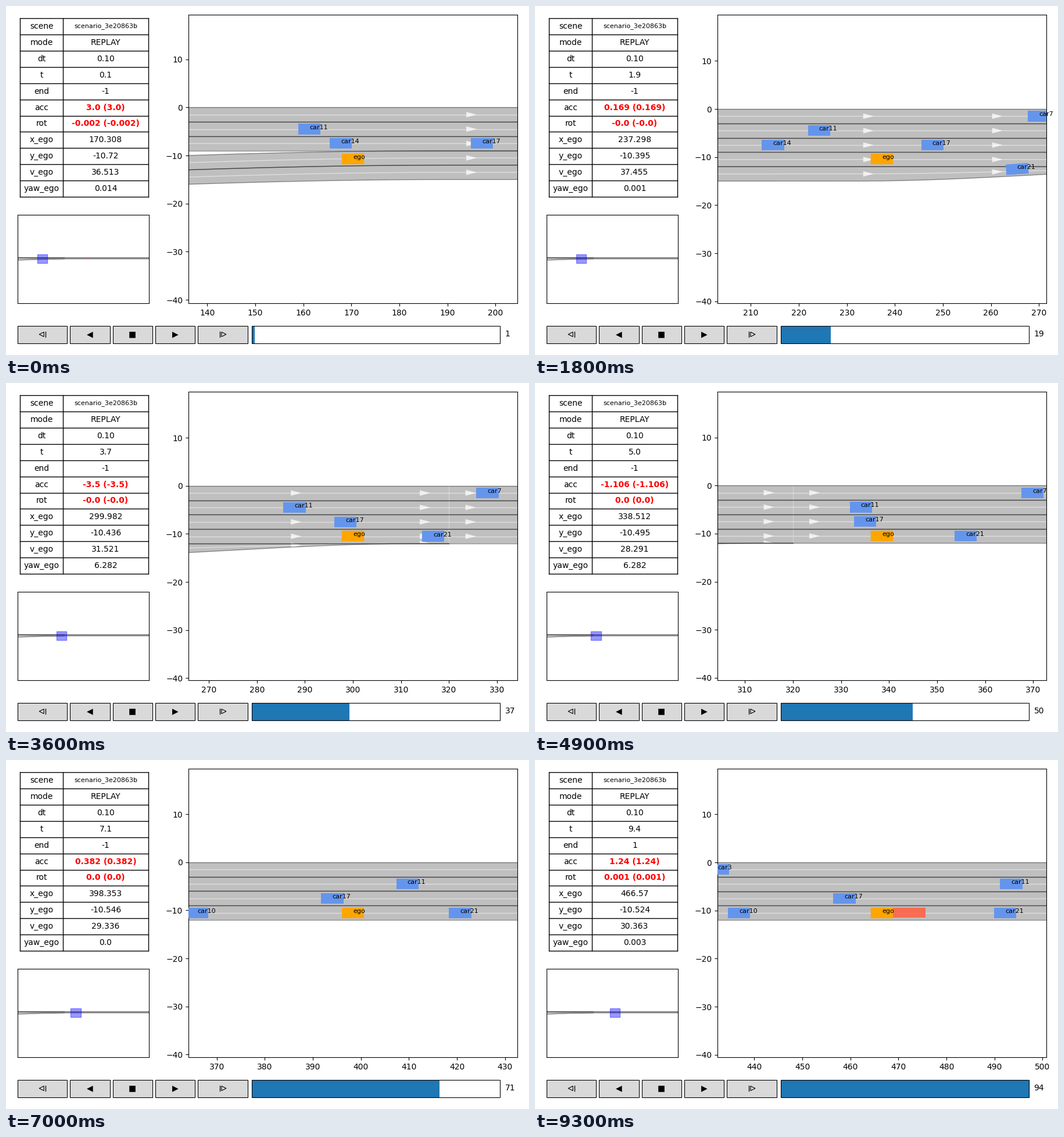
Write a matplotlib script that moves like this. It is 900 by 600 pixels and loops after 9.4 s.

```python
import matplotlib.pyplot as plt
import numpy as np
from matplotlib.animation import FuncAnimation
from matplotlib.patches import Polygon, Rectangle
from matplotlib.ticker import MultipleLocator

W, H = 900, 600
FRAMES = 94
HALF_Y = 30
HALF_X = HALF_Y * 566 / 496
CAR_LENGTH, CAR_WIDTH = 4.65, 2.2
WHEELBASE = 2.6
LANE_W = 3

# Key points of the ego drive: time, position, speed, acceleration
EGO_KEYS = [(0.1, 170.308, 36.513, 3.0),
            (1.9, 237.298, 37.455, 0.169),
            (3.7, 299.982, 31.521, -3.5),
            (7.1, 398.353, 29.336, 0.382),
            (9.4, 466.57, 30.363, 1.24)]

# Traffic: lane, start, speed, acceleration
TRAFFIC = {
    "car3": (0, 103.4, 35, 0),
    "car7": (0, 208.85, 32.2, 0),
    "car10": (3, 122.8, 36.84, -0.73),
    "car11": (1, 157.79, 34.77, 0.2),
    "car14": (2, 165.17, 26.03, 0),
    "car17": (2, 194.35, 28.13, 0),
    "car21": (3, 198.85, 31.2, 0),
}


def smooth(s):
    s = np.clip(s, 0, 1)
    return s * s * (3 - 2 * s)


def ego_drive(t):
    """Position, speed and acceleration from a quintic between key points."""
    k = 0
    while k < len(EGO_KEYS) - 2 and t >= EGO_KEYS[k + 1][0]:
        k += 1
    (t0, x0, v0, a0), (t1, x1, v1, a1) = EGO_KEYS[k:k + 2]
    h = t1 - t0
    c1, c2 = v0 * h, a0 * h * h / 2
    d = x1 - x0 - c1 - c2
    e = v1 * h - c1 - 2 * c2
    f = a1 * h * h - 2 * c2
    poly = [6 * d - 3 * e + f / 2, -15 * d + 7 * e - f, 10 * d - 4 * e + f / 2, c2, c1, x0]
    return [np.polyval(np.polyder(poly, n), (t - t0) / h) / h ** n for n in range(3)]


def ego_y(t):
    """Settle into the lane, drift back slowly, steer up a little at the end."""
    settle = -0.36 * np.exp((0.1 - t) / 0.7)
    drift = -0.186 * smooth((t - 1.2) / 5.8)
    return -10.36 + settle + drift + 0.022 * np.exp((t - 9.4) / 0.25)


def rate(func, t, step=0.005):
    return (func(t + step) - func(t - step)) / (2 * step)


def ego_yaw(t):
    return rate(ego_y, t) / ego_drive(t)[1]


def car_pose(name, t):
    lane, start, speed, accel = TRAFFIC[name]
    x = start + speed * t + accel * t * t / 2
    y = -LANE_W * (lane + 0.5)
    if name == "car21":  # joins from the ending lane while gaining speed
        x += 23.7 * np.exp(-t / 1.62)
        y -= LANE_W * (1 - smooth((t - 1) / 2.3))
    return np.array([x, y])


def corners(x, y, yaw):
    c, s = np.cos(yaw), np.sin(yaw)
    box = np.array([[-1, -1], [1, -1], [1, 1], [-1, 1]]) * [CAR_LENGTH / 2, CAR_WIDTH / 2]
    return box @ np.array([[c, s], [-s, c]]) + [x, y]


def lane_edges(lane, x):
    ramp = -5 * (1 - smooth(x / 190)) if lane >= 3 else 0 * x
    top = -LANE_W * lane + ramp
    bottom = top - LANE_W
    if lane == 4:
        bottom = bottom + LANE_W * smooth((x - 232) / 82)
    return top, bottom


def draw_arrow(ax, lane, x):
    y0, y1 = (np.mean(lane_edges(lane, v)) for v in (x, x + 2.2))
    ax.add_patch(Polygon([(x, y0 - 0.57), (x + 2.2, y1), (x, y0 + 0.57)],
                         color="white", alpha=0.75, lw=0, zorder=1.45))


def draw_road(ax, edge_width, detail):
    for lane in range(5):
        end = 320 if lane == 4 else 900
        x = np.arange(0, end + 1, 2.0)
        top, bottom = lane_edges(lane, x)
        ax.fill_between(x, bottom, top, color="gray", alpha=0.5, lw=0, zorder=1)
        for edge in (top, bottom):
            ax.plot(x, edge, color="black", alpha=0.4, lw=edge_width, zorder=1.5)
        if not detail:
            continue
        ax.plot(x, (top + bottom) / 2, color="white", alpha=0.5, lw=1, zorder=1.4)
        for first, last in ((0, 200), (230, 320), (320, 900)):
            if last <= end:
                for start in np.linspace(first + 3.4, last - 6.1, 4):
                    draw_arrow(ax, lane, start)


def add_goal(ax):
    ax.add_patch(Rectangle((465.7, -11.55), 10, 2.1, color="tomato",
                           alpha=0.9, lw=0, zorder=3))


def pixel_axes(x0, y0, x1, y1):
    return fig.add_axes([x0 / W, 1 - y1 / H, (x1 - x0) / W, (y1 - y0) / H])


fig = plt.figure(figsize=(9, 6), dpi=100, facecolor="white")

# Panel in pixel coordinates for table, buttons and slider
ui = pixel_axes(0, 0, W, H)
ui.set(xlim=(0, W), ylim=(H, 0))
ui.axis("off")

# Table
ROWS = "scene mode dt t end acc rot x_ego y_ego v_ego yaw_ego".split()
TOP, ROW_H = 21.09, 307 / 11
for i in range(len(ROWS) + 1):
    ui.plot([24, 245], [TOP + i * ROW_H] * 2, color="black", lw=1)
for x in (24, 98, 245):
    ui.plot([x, x], [TOP, TOP + len(ROWS) * ROW_H], color="black", lw=1)
cells = {}
for i, row in enumerate(ROWS):
    y = TOP + (i + 0.5) * ROW_H
    ui.text(61.5, y, row, ha="center", va="center", fontsize=10)
    style = dict(color="red", weight="bold") if row in ("acc", "rot") else {}
    cells[row] = ui.text(171.5, y, "", ha="center", va="center",
                         fontsize=8 if row == "scene" else 10, **style)
cells["scene"].set_text("scenario_3e20863b")
cells["mode"].set_text("REPLAY")
cells["dt"].set_text("0.10")

# Buttons: step back, back, stop, play, step forward
BAR_TOP, BAR_H, BAR_MID = 550, 30, 564.4


def step_icon(mid, side):
    px = [mid + side * d for d in (-5.5, 2.5, 2.5)]
    ui.add_patch(Polygon(list(zip(px, (564.5, 560.5, 568.5))), fill=False,
                         ec="black", lw=0.8))
    ui.plot([mid + side * 5] * 2, [560, 569], color="black", lw=0.9)


left = 20.2
for label, width in zip("<\u25c0\u25a0\u25b6>", (85, 68.4, 68.4, 68.4, 86)):
    ui.add_patch(Rectangle((left, BAR_TOP), width, BAR_H, fc="0.85", ec="black", lw=0.8))
    mid = left + width / 2
    if label in "<>":
        step_icon(mid, 1 if label == "<" else -1)
    else:
        ui.text(mid, BAR_MID, label, ha="center", va="center", fontsize=10)
    left += width + 5

# Slider
SLIDER_X, SLIDER_W = 423, 427
bar = ui.add_patch(Rectangle((SLIDER_X, BAR_TOP), 0, BAR_H, fc="#1f77b4", lw=0))
ui.add_patch(Rectangle((SLIDER_X, BAR_TOP), SLIDER_W, BAR_H, fill=False,
                       ec="black", lw=0.8))
counter = ui.text(858.5, BAR_MID, "", ha="left", va="center", fontsize=10)

# Overview map
MAP_SCALE = 226 / 900
overview = pixel_axes(20, 359, 246, 511)
overview.set(xlim=(0, 900), xticks=[], yticks=[],
             ylim=((432 - 511) / MAP_SCALE, (432 - 359) / MAP_SCALE))
draw_road(overview, 0.3, False)
overview.plot([0, 320], [-1.5, -1.5], color="black", alpha=0.35, lw=0.8)
add_goal(overview)
view_box = overview.add_patch(Rectangle((0, 0), 2 * HALF_X, 2 * HALF_Y,
                                        color="blue", alpha=0.4, lw=1, zorder=5))

# Main view
view = pixel_axes(314, 15, 880, 511)
view.xaxis.set_major_locator(MultipleLocator(10))
view.yaxis.set_major_locator(MultipleLocator(10))
draw_road(view, 1, True)
view.plot([320, 320], [-12, 0], color="white", alpha=0.35, lw=0.8, zorder=1.4)
add_goal(view)


def add_car(name, color, zorder):
    body = view.add_patch(Polygon(corners(0, 0, 0), color=color, lw=0, zorder=zorder))
    return body, view.text(0, 0, name, fontsize=8, zorder=8)


cars = {name: add_car(name, "cornflowerblue", 4) for name in TRAFFIC}
cars["ego"] = add_car("ego", "orange", 5)


def place(name, x, y, yaw, center):
    body, label = cars[name]
    body.set_xy(corners(x, y, yaw))
    label.set_position((x, y))
    label.set_visible(abs(x - center) <= HALF_X)


def short(value):
    return str(round(float(value), 3))


def update(i):
    step = i + 1
    t = step / 10
    x, v, acc = ego_drive(t)
    y, yaw = ego_y(t), ego_yaw(t)
    rot = rate(ego_yaw, t) * WHEELBASE / v

    cells["t"].set_text(f"{t:.1f}")
    cells["end"].set_text("1" if step == FRAMES else "-1")
    for row, value in (("acc", acc), ("rot", rot)):
        cells[row].set_text(f"{short(value)} ({short(value)})")
    for row, value in (("x_ego", x), ("y_ego", y), ("v_ego", v),
                       ("yaw_ego", yaw % (2 * np.pi))):
        cells[row].set_text(short(value))

    view.set_xlim(x - HALF_X, x + HALF_X)
    view.set_ylim(y - HALF_Y, y + HALF_Y)
    view_box.set_xy((x - HALF_X, y - HALF_Y))
    for name in TRAFFIC:
        vx, vy = rate(lambda s: car_pose(name, s), t)
        place(name, *car_pose(name, t), np.arctan2(vy, vx), x)
    place("ego", x, y, yaw, x)

    bar.set_width(SLIDER_W * step / FRAMES)
    counter.set_text(str(step))
    return []


anim = FuncAnimation(fig, update, frames=FRAMES, interval=100, repeat=True,
                     repeat_delay=0, init_func=lambda: update(0))
plt.show()
```
